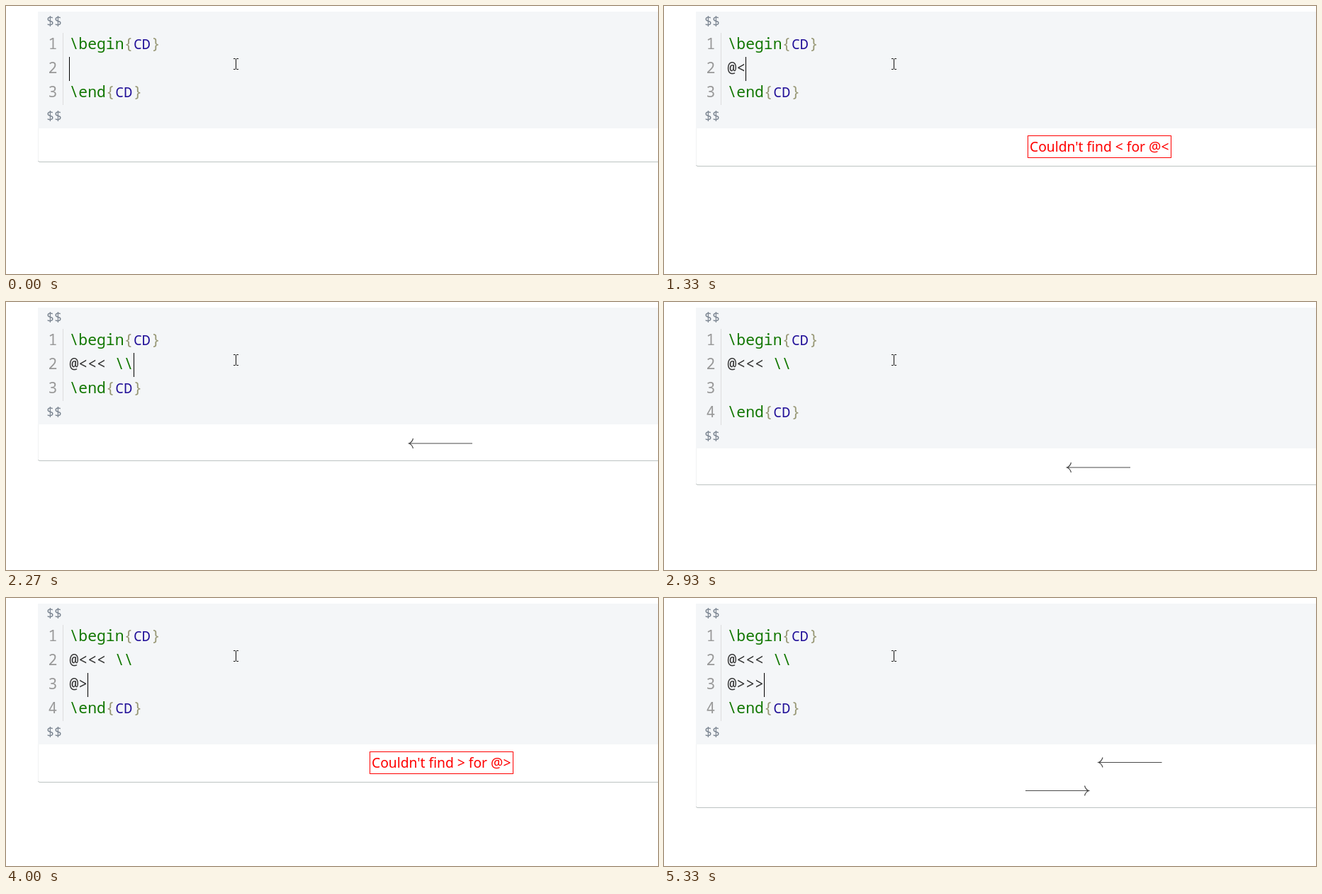
These frames come from a looping animation (920 by 379 pixels, 5.86 s). An HTML page:

```html
<!DOCTYPE html>
<html lang="en">
<head>
<meta charset="utf-8">
<title>Commutative diagram editor</title>
<style>
html, body { margin: 0; width: 100%; height: 100%; overflow: hidden; background: #fff; }
svg { display: block; }
text { white-space: pre; font: 21.4px "Noto Sans Mono", monospace; fill: #333; }
.fence { font-size: 18.3px; fill: #7b8591; }
.num { fill: #999; }
.tag { fill: #170; }
.brace { fill: #997; }
.name { fill: #219; font-size: 20px; font-weight: 500; }
.at { font: 21.4px "Liberation Serif", serif; text-anchor: middle; }
.err { font: 19.26px "Noto Sans", sans-serif; fill: #f00; }
.errbox { fill: none; stroke: #f00; }
.arrow { fill: none; stroke: #4a4a4a; stroke-width: 1.2; }
.frame { fill: none; stroke: #bcc3c2; }
.side { stroke: #f1f2f3; }
</style>
</head>
<body>
<svg id="stage" width="920" height="379" viewBox="0 0 920 379"></svg>
<script>
const LOOP = 5860, LEFT = 89.5, CHAR = 12.84, LINE = 34, BLINK = 530;
const stage = document.getElementById('stage');

// Typing steps: [time, typed lines, caret x]
const typing = [
  [0, [''], 89],
  [470, ['@'], 102],
  [1330, ['@<'], 115],
  [1470, ['@<<'], 128],
  [1600, ['@<<<'], 141],
  [1870, ['@<<< '], 154],
  [2130, ['@<<< \\'], 167],
  [2270, ['@<<< \\\\'], 180],
  [2400, ['@<<< \\\\', ''], 89],
  [3470, ['@<<< \\\\', '@'], 102],
  [4000, ['@<<< \\\\', '@>'], 115],
  [4130, ['@<<< \\\\', '@>>'], 128],
  [4270, ['@<<< \\\\', '@>>>'], 141]
];

// Preview steps: [time, bottom edge, drawing]
const previews = [
  [0, 220, () => ''],
  [470, 223, () => at(614.5, 202)],
  [1330, 226, () => error('<', 183)],
  [1600, 224, () => arrow(568, 200, 1)],
  [2130, 224, () => arrow(565, 200, 1)],
  [2270, 224, () => arrow(568, 200, 1)],
  [2400, 258, () => arrow(568, 234, 1)],
  [3530, 296, () => arrow(578.5, 232.5, 1) + at(556.5, 275)],
  [4000, 260, () => error('>', 217)],
  [4270, 296, () => arrow(612.5, 232.5, 1) + arrow(600, 272.5, -1)]
];

const esc = s => s.replace(/&/g, '&amp;').replace(/</g, '&lt;').replace(/>/g, '&gt;');
const text = (x, y, s, cls = '') => `<text x="${x}" y="${y}" class="${cls}">${esc(s)}</text>`;
const rect = (x, y, w, h, fill) => `<rect x="${x}" y="${y}" width="${w}" height="${h}" fill="${fill}"/>`;
const at = (x, y) => text(x, y, '@', 'at');
const error = (c, y) =>
  `<rect class="errbox" x="513.5" y="${y + .5}" width="202" height="31"/>` +
  text(516, y + 23, `Couldn't find ${c} for @${c}`, 'err');

// The tip is at x; dir 1 points left, -1 points right
const arrow = (x, y, dir) =>
  `<path class="arrow" transform="translate(${x} ${y}) scale(${dir} 1)"
    d="M1 0H90M6.5 -7Q5 -1.5 .5 0Q5 1.5 6.5 7"/>`;

function command(word, y) {
  const col = n => LEFT + n * CHAR, n = word.length;
  return text(LEFT, y, word, 'tag') + text(col(n), y, '{', 'brace') +
    text(col(n + 1) + .5, y, 'CD', 'name') + text(col(n + 3), y, '}', 'brace');
}

function typed(line, y) {
  const cut = line.indexOf('\\');
  if (cut < 0) return text(LEFT, y, line);
  return text(LEFT, y, line.slice(0, cut)) + text(LEFT + cut * CHAR, y, line.slice(cut), 'tag');
}

function draw([, lines, caretX], [, bottom, diagram], caretOn) {
  const count = lines.length + 2, end = 69 + count * LINE;
  const base = i => 61 + i * LINE;
  let out = rect(45, 8, 875, end - 6, '#f4f6f8') + rect(80, 38, 1, count * LINE, '#ddd');
  out += text(57, 28, '$$', 'fence') + text(57, end - 9, '$$', 'fence');
  for (let i = 0; i < count; i++) out += text(59.5, base(i), String(i + 1), 'num');
  out += command('\\begin', base(0)) + command('\\end', base(count - 1));
  lines.forEach((line, i) => out += typed(line, base(i + 1)));
  if (caretOn) out += rect(caretX, 38 + lines.length * LINE, 1, LINE, '#000');
  out += rect(45, end + 2, 875, bottom - end - 2, '#fff');
  out += `<path class="frame side" d="M45.5 ${end + 2}V${bottom - 1}"/>`;
  out += `<path class="frame" d="M45.5 ${bottom - 1}Q45.5 ${bottom + .5} 48 ${bottom + .5}H920"/>`;
  out += diagram();
  out += '<path d="M321 74.5H323.5L324.5 75.5L325.5 74.5H328M324.5 75V89M321 89.5H323.5L324.5 88.5L325.5 89.5H328" fill="none" stroke="#111"/>';
  stage.innerHTML = out;
}

const current = (steps, t) => steps.filter(s => s[0] <= t).pop();
const start = performance.now();
let shown = '';

function tick() {
  const t = (performance.now() - start) % LOOP;
  const code = current(typing, t), preview = current(previews, t);
  // The first caret is already part way through its blink
  const age = t - code[0] + (code[0] ? 0 : BLINK - 270);
  const caretOn = Math.floor(age / BLINK) % 2 === 0;
  const key = [code[0], preview[0], caretOn].join();
  if (key !== shown) draw(code, preview, caretOn);
  shown = key;
  requestAnimationFrame(tick);
}
tick();
</script>
</body>
</html>
```
